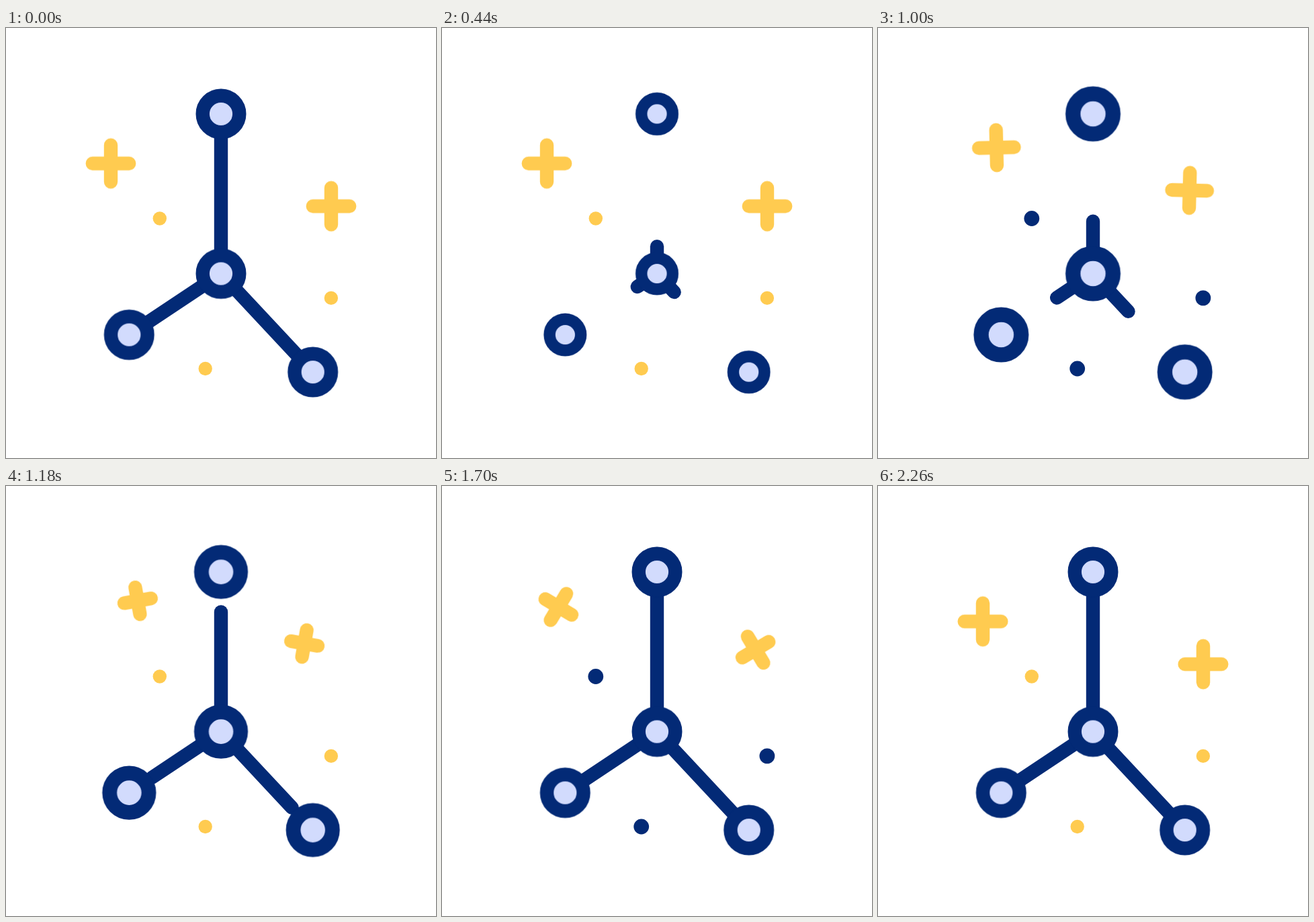
An HTML page for the animation above (2.4 s loop, 640x640 px).

```html
<!DOCTYPE html>
<html lang="en">
<head>
<meta charset="utf-8">
<title>Molecule</title>
<style>
  :root {
    --navy: #032a76;
    --pale: #d2dbfd;
    --gold: #ffcb50;
    --smooth: cubic-bezier(.333, 0, .667, 1);
  }
  html, body { margin: 0; width: 100%; height: 100%; overflow: hidden; background: #fff; }
  svg { display: block; width: 100%; height: 100%; }

  .bond, .node, .dot, .arc, .level, .spin, .cross {
    animation: 2400ms var(--smooth) infinite;
  }

  /* Percentages are milliseconds / 24 */
  .node {
    fill: var(--pale); stroke: var(--navy); stroke-width: 20.4;
    animation-name: pulse;
  }
  @keyframes pulse {
    0%, 2.5% { transform: scale(1); }
    19.17% { transform: scale(.852); }
    44.58% { transform: scale(1.102); }
    56.67%, 100% { transform: scale(1); }
  }

  .bond {
    fill: none; stroke: var(--navy); stroke-width: 20.4; stroke-linecap: round;
    stroke-dasharray: 1 2;
    animation-name: short, hide;
    animation-timing-function: var(--smooth), step-end;
  }
  .bond.long { animation-name: long, hide; }
  @keyframes long {
    0%, 2.5% { stroke-dashoffset: 0; }
    21.46%, 35% { stroke-dashoffset: 1; }
    54.4%, 100% { stroke-dashoffset: 0; }
  }
  @keyframes short {
    0%, 2.5% { stroke-dashoffset: 0; }
    21.46%, 34.1% { stroke-dashoffset: 1; }
    53.5%, 100% { stroke-dashoffset: 0; }
  }
  @keyframes hide {
    0% { opacity: 1; }
    21.4% { opacity: 0; }
    35.1%, 100% { opacity: 1; }
  }

  .dot { fill: var(--gold); animation-name: blink; animation-timing-function: step-end; }
  @keyframes blink {
    0%, 44.1% { fill: var(--gold); r: 10.2px; }
    19.1%, 69.1% { fill: var(--navy); r: 11.4px; }
    94.1%, 100% { fill: var(--gold); r: 10.2px; }
  }

  /* The plus signs swing along an arc while staying level, then spin and shrink */
  .arc { transform-origin: 47.7px 20.65px; animation-name: swing; }
  .level { animation-name: unswing; }
  @keyframes swing {
    0%, 29.17% { transform: rotate(0deg); }
    51.9%, 56.25% { transform: rotate(60.3deg); }
    86%, 100% { transform: rotate(0deg); }
  }
  @keyframes unswing {
    0%, 29.17% { transform: rotate(0deg); }
    51.9%, 56.25% { transform: rotate(-60.3deg); }
    86%, 100% { transform: rotate(0deg); }
  }
  .spin { animation-name: spin; }
  @keyframes spin {
    0% { transform: rotate(0deg); }
    37.5% { transform: rotate(0deg); animation-timing-function: cubic-bezier(.4, 0, .7, .5); }
    49.17% { transform: rotate(-10deg); animation-timing-function: linear; }
    56.67% { transform: rotate(-20.5deg); animation-timing-function: cubic-bezier(.3, .2, .7, .7); }
    70.83% { transform: rotate(-59deg); animation-timing-function: cubic-bezier(.4, .45, .7, 1); }
    85.83%, 100% { transform: rotate(-90deg); }
  }
  .cross {
    fill: none; stroke: var(--gold); stroke-width: 20.4; stroke-linecap: round;
    animation-name: shrink;
  }
  @keyframes shrink {
    0% { stroke-dasharray: 27.2px 99px; }
    37.5% { stroke-dasharray: 27.2px 99px; animation-timing-function: cubic-bezier(.4, 0, .7, .5); }
    49.17% { stroke-dasharray: 20.3px 99px; animation-timing-function: cubic-bezier(.33, .45, .67, 1); }
    56.67% { stroke-dasharray: 16.5px 99px; animation-timing-function: cubic-bezier(.4, 0, .67, .6); }
    70.83% { stroke-dasharray: 22.9px 99px; animation-timing-function: cubic-bezier(.33, .45, .67, 1); }
    85.83%, 100% { stroke-dasharray: 27.2px 99px; }
  }
</style>
</head>
<body>
<svg viewBox="0 0 640 640">
  <g transform="translate(156 201.6)">
    <g class="arc"><g class="level"><g class="spin">
      <path class="cross" d="M0 0V-27.2M0 0V27.2M0 0H-27.2M0 0H27.2"/>
    </g></g></g>
  </g>
  <g transform="translate(484 265.2) scale(-1 1)">
    <g class="arc"><g class="level"><g class="spin">
      <path class="cross" d="M0 0V-27.2M0 0V27.2M0 0H-27.2M0 0H27.2"/>
    </g></g></g>
  </g>

  <circle class="dot" cx="228.8" cy="283.5" r="10.2"/>
  <circle class="dot" cx="483.9" cy="401.9" r="10.2"/>
  <circle class="dot" cx="296.7" cy="507" r="10.2"/>

  <path class="bond long" pathLength="1" d="M320 338.3V155.2"/>
  <path class="bond" pathLength="1" d="M297.3 380.7L206 441.5"/>
  <path class="bond" pathLength="1" d="M338.6 385.6L438.1 492.1"/>

  <g transform="translate(320 127.9)"><circle class="node" r="27.3"/></g>
  <g transform="translate(320 365.6)"><circle class="node" r="27.3"/></g>
  <g transform="translate(183.3 456.6)"><circle class="node" r="27.3"/></g>
  <g transform="translate(456.7 512.1)"><circle class="node" r="27.3"/></g>
</svg>
</body>
</html>
```
